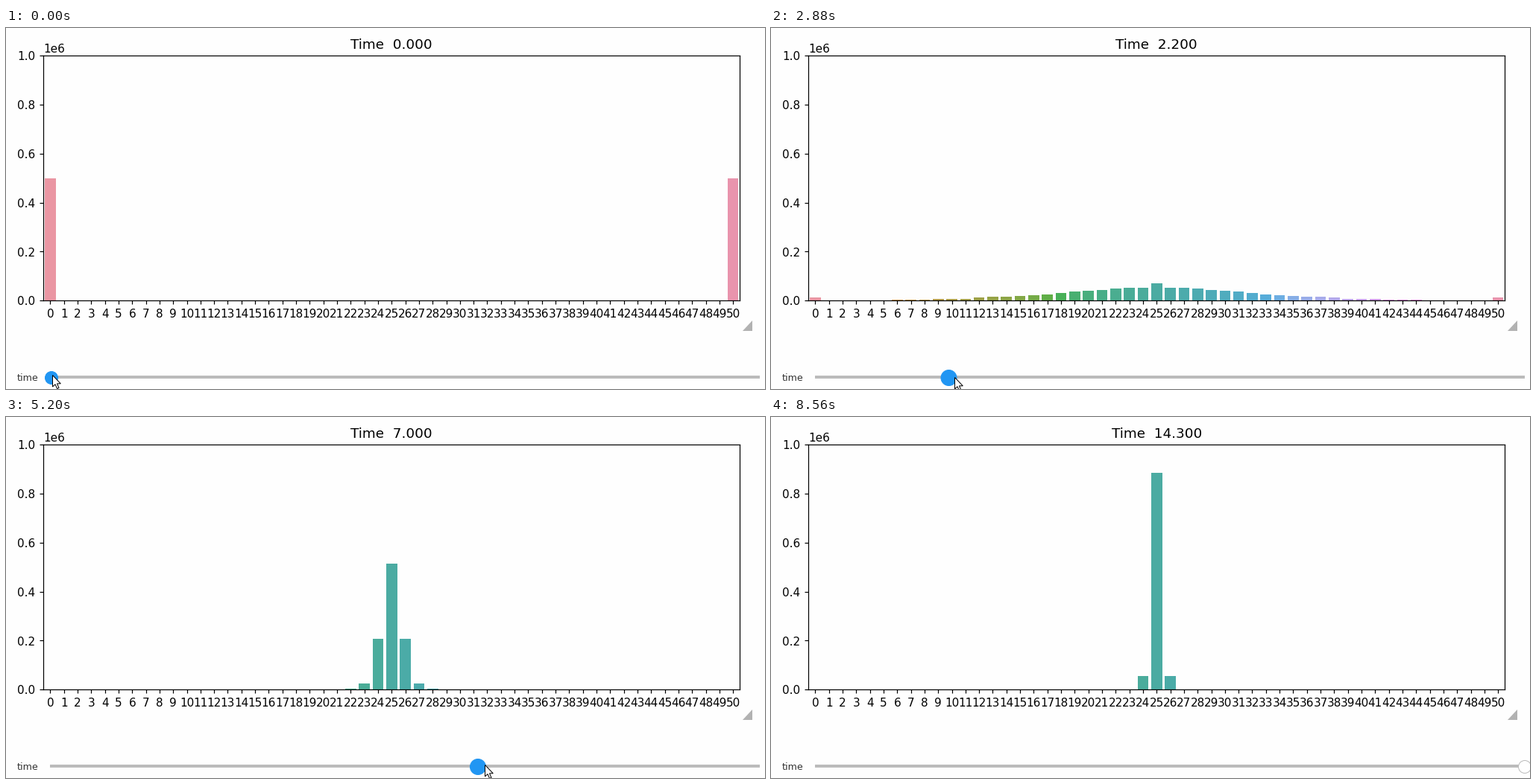
Recreate the animation shown at these times as a matplotlib script. Size 1018x485 px, loop 8.95 s.

```python
import colorsys

import matplotlib.pyplot as plt
import numpy as np
from matplotlib.animation import FuncAnimation
from matplotlib.colors import to_rgb
from matplotlib.patches import Circle, Polygon, Rectangle

W, H, DPI = 1018, 485, 110
PX = 72 / DPI                      # points per pixel
LOOP, TICK = 8950, 50              # ms
N = 51                             # opinion levels
TRACK_LEFT, TRACK_RIGHT = 59, 1011
PAPER = "#fefefe"
BLUE, GREY, WHITE = (np.array(to_rgb(c)) for c in ("#2196f3", "#bbbbbb", "w"))

plt.rcParams["font.family"] = "DejaVu Sans"


# --- colours: evenly spaced HUSL hues, slightly desaturated -----------------
def luv_to_linear(light, chroma, hue):
    u = chroma * np.cos(hue) / (13 * light) + 0.19784
    v = chroma * np.sin(hue) / (13 * light) + 0.46834
    y = ((light + 16) / 116) ** 3
    x = 9 * y * u / (4 * v)
    z = (9 * y - 15 * v * y - v * x) / (3 * v)
    return np.array([3.2406 * x - 1.5372 * y - 0.4986 * z,
                     -0.9689 * x + 1.8758 * y + 0.0415 * z,
                     0.0557 * x - 0.2040 * y + 1.0570 * z])


def husl(hue, sat=0.891, light=69.3):
    lo, hi = 0.0, 200.0
    for _ in range(30):            # largest chroma still inside the gamut
        mid = (lo + hi) / 2
        rgb = luv_to_linear(light, mid, hue)
        if rgb.min() >= 0 and rgb.max() <= 1:
            lo = mid
        else:
            hi = mid
    rgb = np.clip(luv_to_linear(light, lo * sat, hue), 0, 1)
    return np.where(rgb <= 0.0031308, 12.92 * rgb,
                    1.055 * rgb ** (1 / 2.4) - 0.055)


def bar_color(i):
    h, l, s = colorsys.rgb_to_hls(*husl(np.radians(359 * (i / N + 0.01))))
    return colorsys.hls_to_rgb(h, l, s * 0.75)


# --- model: random pairs meet and move to their (rounded) mean --------------
def drift(p):
    pairs = np.convolve(p, p)
    gain = 2 * pairs[::2]
    gain[:-1] += pairs[1::2]
    gain[1:] += pairs[1::2]
    return gain - 2 * p


def simulate(tenths, sub=5):
    p = np.zeros(N)
    p[0] = p[-1] = 0.5
    dt = 0.1 / sub
    history = [p]
    for _ in range(tenths):
        for _ in range(sub):
            p = p + dt * drift(p + dt / 2 * drift(p))
        history.append(p)
    return np.array(history) * 1e6


HISTORY = simulate(143)

# --- motion -----------------------------------------------------------------
# The drag advances in even steps; key poses: step, knob x, tip x, tip y, time
DRAG_START, STEP = 1040, 130.5     # ms
PRESS, RELEASE, FADE = 410, 7990, 8430
KEYS = np.array([(-3, 61, 62, 466, 0),
                 (1, 80, 82, 465, 0.1),
                 (8, 145, 150, 469, 1.0),
                 (20, 332, 341, 469, 3.3),
                 (32, 633, 642, 467, 7.0),
                 (40, 826, 839, 464, 10.8),
                 (50, 1058, 1075, 463, 14.3)])


def pose(now):
    step = np.floor((now - DRAG_START) / STEP)
    return [np.interp(step, KEYS[:, 0], col) for col in KEYS.T[1:]]


# --- chart ------------------------------------------------------------------
fig = plt.figure(figsize=((W + 1e-6) / DPI, (H + 1e-6) / DPI), dpi=DPI,
                 facecolor=PAPER)
ax = fig.add_axes([50.2 / W, 118.7 / H, 934.1 / W, 329 / H], facecolor=PAPER)
bars = ax.bar(range(N), HISTORY[0], width=0.8,
              color=[bar_color(i) for i in range(N)])
ax.set_xlim(-0.5, N - 0.5)
ax.set_ylim(0, 1e6)
ax.set_xticks(range(N))
title = ax.set_title("Time  0.000")

# --- widgets, in pixel coordinates ------------------------------------------
ui = fig.add_axes([0, 0, 1, 1])
ui.set_xlim(0, W)
ui.set_ylim(H, 0)
ui.axis("off")
ui.add_patch(Polygon([(1001, 393.5), (1001, 407), (987.5, 407)],
                     fc="#b2b2b2", ec="none"))
ui.text(14.6, 474, "time", fontsize=12.6 * PX, color="#333333")
ui.add_patch(Rectangle((TRACK_LEFT, 467), TRACK_RIGHT - TRACK_LEFT, 4,
                       fc=GREY, ec="none"))
knob = ui.add_patch(Circle((61, 470), 8.5, lw=PX))
ARROW = np.array([(0.5, 0.5), (0.5, 16), (4, 12.7), (6.6, 18.5), (9, 17.5),
                  (6.5, 11.8), (11.3, 11.8)])
cursor = ui.add_patch(Polygon(ARROW, fc="white", ec="black", lw=PX))


def draw(k):
    now = k * TICK + 40
    knob_x, tip_x, tip_y, time = pose(now)

    tenth = round(time * 10)
    for bar, count in zip(bars, HISTORY[tenth]):
        bar.set_height(count)
    title.set_text(f"Time  {tenth / 10:.3f}")

    # focus fades out in two steps after the release
    fade = np.clip((now - FADE) // STEP + 1, 0, 2) / 2
    knob.set_center((min(knob_x, TRACK_RIGHT), 470))
    knob.set_radius(10.5 if PRESS <= now < RELEASE else 8.5)
    knob.set_facecolor(BLUE + fade * (WHITE - BLUE))
    knob.set_edgecolor(BLUE + fade * (GREY - BLUE))
    cursor.set_xy(ARROW + (round(tip_x), round(tip_y)))
    return [*bars, title, knob, cursor]


anim = FuncAnimation(fig, draw, frames=LOOP // TICK, interval=TICK,
                     repeat=True, repeat_delay=0, blit=False)
plt.show()
```
